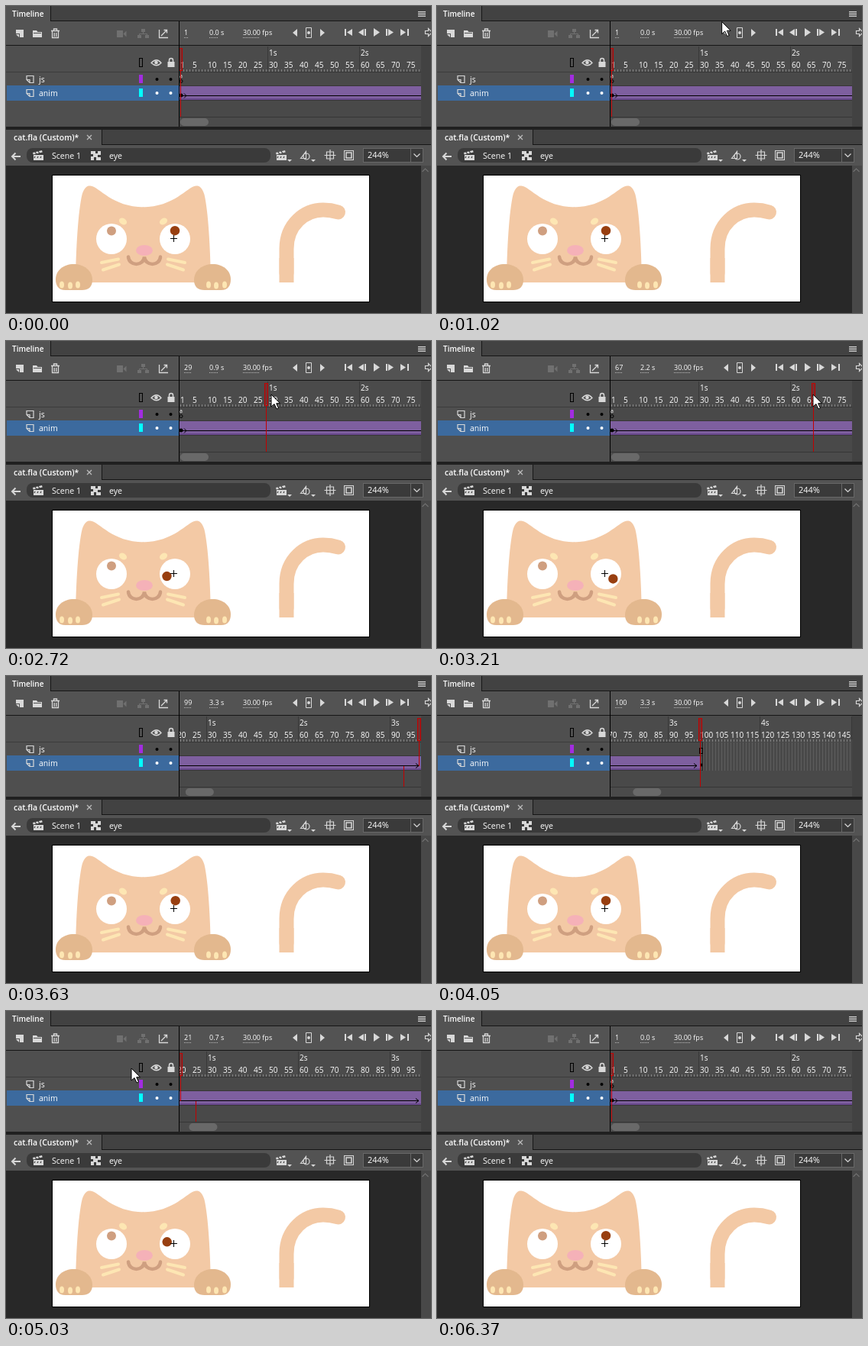
An HTML page with a canvas for the animation above (8100 ms loop, 556x402 px).

```html
<!DOCTYPE html>
<html lang="en">
<head>
<meta charset="utf-8">
<title>Timeline scrubbing</title>
<style>
html, body { margin: 0; width: 100%; height: 100%; overflow: hidden; background: #282828; }
canvas { display: block; }
</style>
</head>
<body>
<canvas width="556" height="402"></canvas>
<script>
const ctx = document.querySelector('canvas').getContext('2d');
const LOOP = 8100, STEP = 70, LAST = 100;
const PANEL = '#535353', DARK = '#3a3a3a', LINE = '#161616', ICON = '#d8d8d8', DIM = '#707070';
const SKIN = '#f3c9a5', PALE = '#fde6b3', PAW = '#e3b88e', MUTED = '#cf9f80';

// Keys: [time, value, ...]
const frameKeys = [[2020, 1], [2090, 2], [2300, 8], [2510, 17], [2720, 29], [3560, 94], [3630, 99], [3700, 100],
  [4400, 100], [4470, 93], [4540, 83], [4610, 74], [4680, 73], [4750, 63], [4960, 26], [5030, 21], [5310, 1]];
const scrollKeys = [[3360, 0], [3560, 15], [3630, 20], [4050, 70], [4680, 70], [4750, 62], [4960, 25], [5030, 20], [5310, 0]];
const cursorKeys = [[740, 460, -8], [1080, 350, 28], [1290, 260, 58], [1500, 220, 70], [1570, 218, 66], [1640, 224, 69],
  [1710, 229, 73], [2020, 229, 73], [2300, 262, 71], [2510, 300, 70], [2720, 347, 70], [3440, 560, 70], [4050, 580, 70],
  [4120, 550, 71], [4400, 360, 72], [4540, 272, 72], [4610, 238, 72], [4680, 233, 72], [4750, 215, 73],
  [5030, 164, 75], [5450, 146, 75], [5950, 146, 75], [6090, 150, 60], [6300, 176, -8], [6370, 180, -30]];

function at(keys, t) {
  const i = keys.findIndex(k => k[0] > t);
  if (i === 0) return keys[0].slice(1);
  if (i < 0) return keys[keys.length - 1].slice(1);
  const a = keys[i - 1], b = keys[i], p = (t - a[0]) / (b[0] - a[0]);
  return a.slice(1).map((v, j) => v + (b[j + 1] - v) * p);
}
const value = (keys, t) => Math.round(at(keys, t)[0]);

function stepped(t) {
  const base = t < 2090 ? 1570 : t < 6020 ? 2090 : 6020;
  return base + Math.floor((t - base) / STEP) * STEP;
}

function rect(color, x, y, w, h) {
  ctx.fillStyle = color;
  ctx.fillRect(x, y, w, h);
}
function pill(color, x, y, w, h, r) {
  ctx.fillStyle = color;
  ctx.beginPath();
  ctx.roundRect(x, y, w, h, r);
  ctx.fill();
}
function frame(color, x, y, w, h) {
  ctx.strokeStyle = color;
  ctx.lineWidth = 1;
  ctx.strokeRect(x + .5, y + .5, w - 1, h - 1);
}
function fill(color, d) {
  ctx.fillStyle = color;
  ctx.fill(new Path2D(d));
}
function stroke(color, width, d, cap = 'butt') {
  ctx.strokeStyle = color;
  ctx.lineWidth = width;
  ctx.lineCap = cap;
  ctx.stroke(new Path2D(d));
}
function oval(color, x, y, rx, ry = rx, turn = 0) {
  ctx.fillStyle = color;
  ctx.beginPath();
  ctx.ellipse(x, y, rx, ry, turn, 0, 7);
  ctx.fill();
}
function text(str, x, y, size, weight = 400) {
  ctx.font = `${weight} ${size}px "Open Sans", "Noto Sans", sans-serif`;
  ctx.fillStyle = '#fff';
  ctx.fillText(str, x, y);
}
function moved(x, y, draw, sx = 1) {
  ctx.save();
  ctx.translate(x, y);
  ctx.scale(sx, 1);
  draw();
  ctx.restore();
}

const page = (x, y) => moved(x, y, () => {
  stroke(ICON, 1.2, 'M-4.500-4.500h9v9h-5l-4-4zM-4.500.500h4v4');
});
const clapper = (x, y) => moved(x, y, () => {
  fill(ICON, 'M-6-1H7V6H-6zM-7-4L5-7l.7 2.6L-6.3-1.4z');
  stroke(DARK, 1.2, 'M-4-5l2 3M0-6l2 3M-4 1l-1 2M0 1l-1 2M4 1l-1 2');
});
const caret = (x, y) => fill(ICON, `M${x} ${y}h6l-3 3z`);
const chevron = (color, x, y, up) => stroke(color, 1.2, `M${x - 4} ${y + 2 * up}l4 ${-4 * up}l4 ${4 * up}`);

function drawTop(n) {
  rect(PANEL, 0, 0, 556, 158);
  rect('#424242', 0, 0, 556, 19);
  rect(PANEL, 0, 0, 58, 20);
  rect(LINE, 58, 0, 1, 19);
  rect(LINE, 58, 19, 498, 1);
  text('Timeline', 8, 14, 10, 600);
  for (let y = 7; y < 15; y += 2) rect(ICON, 539, y, 10, 1);

  fill(ICON, 'M13 31h10v10h-5v-5h-5zM13 37l4 4v-4z');
  fill(ICON, 'M35 32h5l1.500 2H47v7H35z');
  stroke(PANEL, 1, 'M36 35.500h10');
  stroke(ICON, 1.3, 'M59 32.500h11M62.500 32v-2h4v2M60.500 33v8.500h8V33M63.200 35v5M65.800 35v5');
  fill(DIM, 'M145 32h8v9h-8zM153.500 36.500l4-4v8z');
  fill(DIM, 'M177 30h5v4h-5zM172 38h5v4h-5zM182 38h5v4h-5z');
  stroke(DIM, 1, 'M179.500 34v2.500M174.500 38v-1.500h10V38');
  stroke(ICON, 1.3, 'M200.500 31v10.500H212M203 39l7-7M206.500 31.500h4v4');

  text(n, 233, 38, 9);
  text(((n - 1) / 30).toFixed(1) + ' s', 266, 38, 9);
  text('30.00 fps', 310, 38, 9);
  ctx.setLineDash([1, 1]);
  stroke('#bbb', 1, `M233 41.500h${n > 9 ? 10 : 5}M266 41.500h12M310 41.500h22`);
  ctx.setLineDash([]);

  fill(ICON, 'M381 30v10l-6-5zM411 30v10l6-5zM453 30v9l-7-4.500zM443 30h2v9h-2zM468 30v9l-7-4.500zM469 30h2v9h-2z');
  fill(ICON, 'M481 29v11l8-5.500zM497 30h2v9h-2zM500 30v9l7-4.500zM516 30v9l7-4.500zM525 30h2v9h-2z');
  stroke(ICON, 1, 'M392.500 28.500h7v13h-7z');
  oval(ICON, 396, 35, 2);
  stroke(ICON, 1.2, 'M548.500 32.500h4v-3l5 5l-5 5v-3h-4z');
}

function drawLayers() {
  rect('#4f4f4f', 0, 51, 226, 107);
  rect(LINE, 0, 51, 556, 1);
  frame('#000', 174, 68, 5, 12);
  stroke(ICON, 1.3, 'M190 74.500Q197 67 203 74.500Q197 81 190 74.500z');
  oval(ICON, 196.5, 74, 2.3);
  fill(ICON, 'M211.500 73h9v7h-9z');
  stroke(ICON, 1.5, 'M213.500 73v-2a2.500 2.500 0 0 1 5 0v2');
  rect('#3c3c3c', 0, 86, 226, 1);
  rect('#3c6a9e', 1, 104, 225, 20);
  const rows = [['js', 96, '#a22ce0', '#000'], ['anim', 114, '#00ffff', '#fff']];
  for (const [name, y, color, dot] of rows) {
    page(31.5, y);
    text(name, 43, y + 4, 10.5);
    rect(color, 174, y - 6, 5, 11);
    oval(dot, 197.5, y, 2);
    oval(dot, 215.5, y, 2);
  }
}

function drawRuler(now, before) {
  const x = f => 224 + 4 * (f - now.scroll);
  const start = x(1) - 1, last = x(LAST), end = x(LAST + 1);
  rect('#4b4b4b', 227, 52, 329, 106);
  rect('#494949', 227, 86, 316, 60);
  ctx.save();
  ctx.beginPath();
  ctx.rect(226, 51, 317, 107);
  ctx.clip();

  for (const y of [86, 104, 123]) rect('#363636', start, y, end - start, 1);
  rect('#363636', 227, 145, 316, 1);
  for (let f = Math.max(1, now.scroll); f < now.scroll + 81; f++) {
    rect('#858585', x(f), 83, 1, 3);
    if (f > LAST) rect('#5e5e5e', x(f), 87, 1, 37);
    if (f % 30 === 0) {
      rect('#383838', x(f) - 2, 53, 1, 30);
      text(f / 30 + 's', x(f), 65, 10);
    }
    if (f === 1 || f % 5 === 0) text(f, x(f), 81, 10);
  }

  rect('#7e5f9f', start, 105, last - start, 18);
  rect('#68488c', start, 121, last - start, 2);
  rect('#000', start, 117, last - 4 - start, 1);
  stroke('#000', 1, `M${last - 8} 114.500l4 3l-4 3M${x(2) + 1} 114.500l3 3l-3 3`);
  oval('#000', x(1) + 1, 117, 2.5);
  oval('#000', last + 2, 116.5, 2);
  rect('#222', end - 1, 87, 1, 37);
  frame('#000', last - 1, 94, 5, 8);
  text('a', x(1) - 1, 94, 7);
  stroke('#000', 1, `M${x(1) + 3} 98.500a2 2 0 1 0-4 0a2 2 0 1 0 4 0`);

  pill('#696969', 228 + before.scroll * .457, 147, 37, 10, 5);

  // The lower part of the playhead lags while the view is scrolled.
  const head = x(now.frame), lags = now.scroll || before.scroll;
  rect('rgba(190,0,0,.35)', head - 2, 55, 5, 30);
  frame('#c30000', head - 2, 55, 5, 30);
  rect('#c30000', head, 85, 1, lags ? 33 : 60);
  if (lags) rect('#c30000', x(before.frame), 118, 1, 27);
  ctx.restore();

  rect('#000', 226, 20, 1, 138);
  rect('#424242', 543, 52, 13, 106);
}

function drawDocumentBar() {
  rect('#202020', 0, 158, 556, 4);
  rect('#424242', 0, 162, 556, 20);
  rect(PANEL, 0, 162, 125, 20);
  rect(LINE, 125, 162, 1, 19);
  rect(LINE, 125, 181, 431, 1);
  rect(PANEL, 0, 182, 556, 27);
  text('cat.fla (Custom)*', 10, 176, 10.5, 600);
  stroke('#bbb', 1.3, 'M106 169l6 6M112 169l-6 6');

  pill(DARK, 27, 186, 319, 19, 8);
  stroke(ICON, 2, 'M8 197h11M12.500 192.500L8 197l4.500 4.500');
  clapper(42, 196);
  text('Scene 1', 60, 200, 10.6);
  fill(ICON, 'M111 190h6v3h3v-3h4v5h-4v3h4v4h-6v-4h-3v4h-4v-5h3v-3h-3z');
  text('eye', 135, 200, 10.6);

  clapper(360, 196);
  caret(368, 201);
  stroke(ICON, 1.2, 'M385.500 199.500l7-9v9zM397 197a4 4 0 1 0-8 0a4 4 0 1 0 8 0');
  caret(399, 201);
  stroke(ICON, 1.2, 'M424 188v15M416.500 195.500h15M419.500 191h9v9h-9z');
  frame(ICON, 442, 189, 13, 13);
  stroke(ICON, 1.5, 'M445 192h7v7h-7z');
  rect(DARK, 467, 186, 79, 19);
  frame('#686868', 467, 186, 79, 19);
  rect('#686868', 529, 186, 1, 19);
  text('244%', 473, 199, 11);
  chevron(ICON, 537.5, 195.5, -1);
}

function catSide() {
  // Left half, with x measured from the face axis.
  fill(SKIN, 'M1 362H-88.500C-88 318-85 268-80 247C-77 237-73 235-69 235.500C-57 237-41 263 1 263.500z');
  fill(PAW, 'M-102 372C-111 372-114.500 366-114.500 358C-114.500 346-104 338-91 338C-78 338-66.500 346-66.500 359C-66.500 368-72 372-80 372z');
  [[-106.5, 365], [-95.5, 366], [-85.5, 365]].forEach(p => oval(PALE, ...p, 3, 4.6));
  oval('#fff', -41.5, 305, 20);
  oval(PALE, -26.5, 282, 5.5, 4, .6);
  stroke(PALE, 4, 'M-54.500 336L-32.500 331.500M-52.500 345.500L-31.500 338.500', 'round');
}

function drawStage(n) {
  rect('#282828', 0, 209, 556, 193);
  rect('#484848', 543, 209, 13, 193);
  chevron(DIM, 548.5, 215, 1);
  rect('#000', 60, 221, 416, 167);
  rect('#fff', 61, 222, 414, 165);

  moved(179.5, 0, catSide);
  moved(179.5, 0, catSide, -1);
  stroke(MUTED, 4.5, 'M160 328.500C161 341 180 341 181 328.500C182 341 201 341 202 328.500', 'round');
  oval('#f5b1b8', 181, 320, 11, 7);
  oval(MUTED, 138, 294.5, 6);

  const turn = 2 * Math.PI * (n - 1) / (LAST - 1);
  oval('#983f10', 221 - 10.8 * Math.sin(turn), 305.7 - 11.5 * Math.cos(turn), 6.2);
  rect('#000', 215, 304, 9, 1);
  rect('#000', 219, 300, 1, 9);

  stroke(SKIN, 19, 'M367 350V318C367 286 391 267 415 267Q425 267 434.500 270', 'round');
  rect(SKIN, 357.5, 330, 19, 32);
}

function drawCursor(x, y) {
  moved(x, y, () => {
    const arrow = 'M0 0V16L4 12.500L7 19L9.500 18L6.700 11.700H11.500z';
    fill('#fff', arrow);
    stroke('#000', 1, arrow);
  });
}

const state = t => ({ frame: value(frameKeys, t), scroll: value(scrollKeys, t) });

function draw(ms) {
  const t = ms % LOOP, q = stepped(t);
  const now = state(q), before = state(q - STEP);
  drawTop(now.frame);
  drawLayers();
  drawRuler(now, before);
  drawDocumentBar();
  drawStage(now.frame);
  if (t >= 740 && t < 6370) drawCursor(...at(cursorKeys, q));
}

const began = performance.now();
function tick() {
  draw(performance.now() - began);
  requestAnimationFrame(tick);
}
tick();
</script>
</body>
</html>
```
